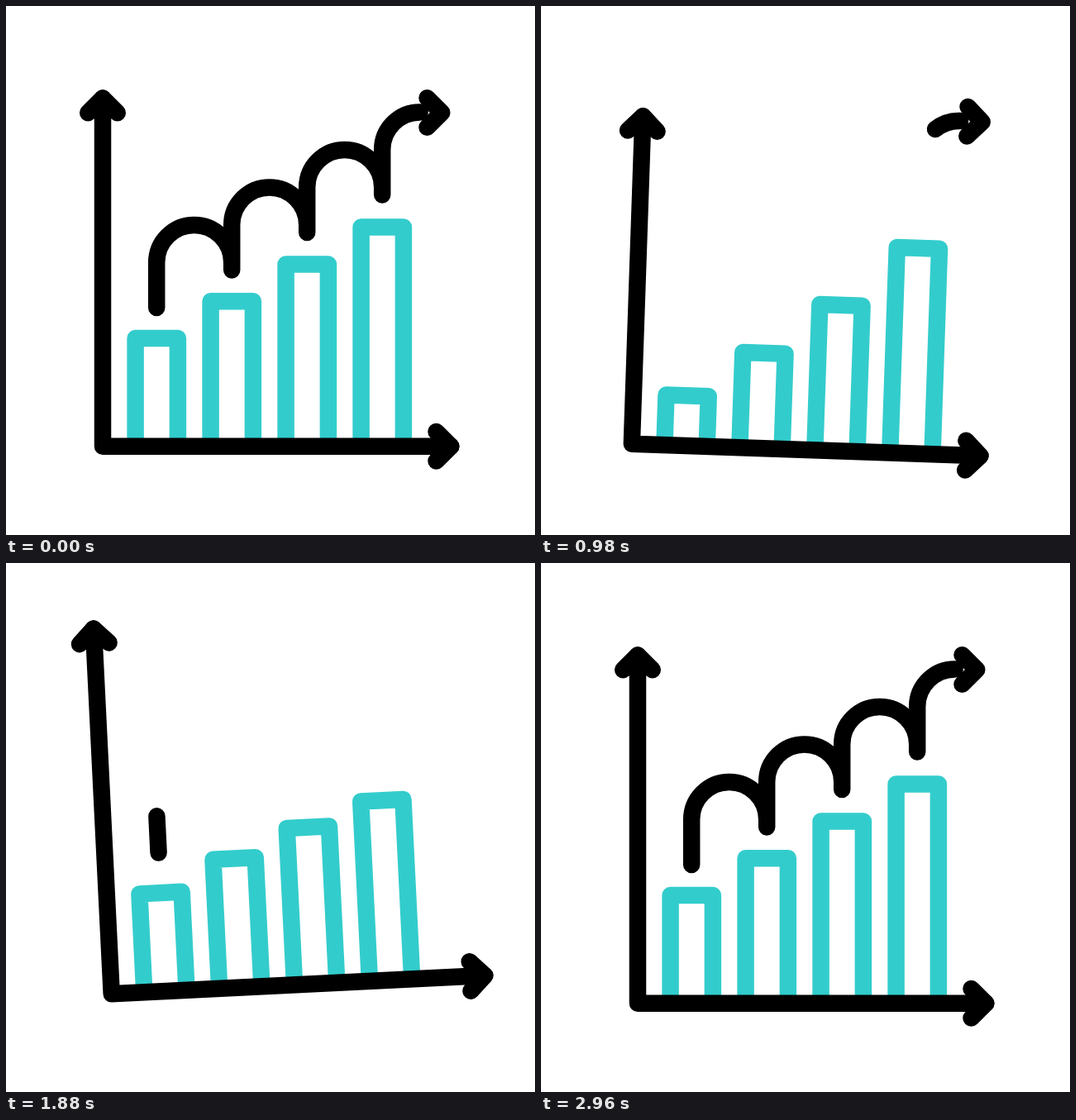
Animation of 640x640 px, one loop 3.6 s. Source, as an HTML page with a canvas:

```html
<!DOCTYPE html>
<html lang="en">
<head>
<meta charset="utf-8">
<title>Growth chart</title>
<style>
  html, body { margin: 0; width: 100%; height: 100%; overflow: hidden; background: #fff; }
  canvas { display: block; }
</style>
</head>
<body>
<canvas id="stage" width="640" height="640"></canvas>
<script>
const g = document.getElementById('stage').getContext('2d');
const LOOP = 3600, BLACK = '#000', TEAL = '#33cccc';
const ORIGIN = { x: 117, y: 532.7 }, AXIS = 421.3;
const R = 45.5, RISE = 54.5, DROP = 9;
const CURVE = 3 * (RISE + Math.PI * R + DROP) + RISE + Math.PI * R / 2;

// Ease along cubic-bezier(a, 0, b, 1)
const bezier = (a, b) => x => {
  let lo = 0, hi = 1, s = 0.5;
  for (let i = 0; i < 20; i++) {
    const u = 1 - s;
    if (3 * u * u * s * a + 3 * u * s * s * b + s * s * s < x) lo = s; else hi = s;
    s = (lo + hi) / 2;
  }
  return s * s * (3 - 2 * s);
};
const soft = p => p * p * (3 - 2 * p);
const snap = bezier(0.15, 0.15);
const glide = bezier(0.33, 0.2);

// Value at time t through [time, value] keys
function track(t, ease, keys) {
  if (t <= keys[0][0]) return keys[0][1];
  for (let i = 1; i < keys.length; i++) {
    const [t0, v0] = keys[i - 1], [t1, v1] = keys[i];
    if (t < t1) return v0 + (v1 - v0) * ease((t - t0) / (t1 - t0));
  }
  return keys[keys.length - 1][1];
}

function line(color, points) {
  g.strokeStyle = color;
  g.beginPath();
  points.forEach(([x, y]) => g.lineTo(x, y));
  g.stroke();
}

function head(x, y, angle) {
  g.save();
  g.translate(x, y);
  g.rotate(angle);
  line(BLACK, [[-17.8, -17.8], [0, 0], [-17.8, 17.8]]);
  g.restore();
}

function bars(t) {
  g.lineCap = 'butt';
  for (let i = 0; i < 4; i++) {
    const grow = track(t - 120 * i, snap, [[200, 0], [475, 18.5], [1310, -79], [2410, 0]]);
    const x = 156.6 + 91 * i, top = 402 - 44.8 * i - grow;
    line(TEAL, [[x, ORIGIN.y], [x, top], [x + 51.3, top], [x + 51.3, ORIGIN.y]]);
  }
  g.lineCap = 'round';
}

function axes(t) {
  const stretch = (low, high) =>
    AXIS + track(t, glide, [[200, 0], [600, low], [2300, high], [2950, 0]]);
  const top = ORIGIN.y - stretch(-40.5, 23.5), right = ORIGIN.x + stretch(-10, 32.5);
  line(BLACK, [[ORIGIN.x, top], [ORIGIN.x, ORIGIN.y], [right, ORIGIN.y]]);
  head(ORIGIN.x, top, -Math.PI / 2);
  head(right, ORIGIN.y, 0);
}

function curve(t) {
  const drawing = t >= 1500;
  const from = drawing ? 0 : CURVE * track(t, glide, [[200, 0], [1260, 1]]);
  const to = drawing ? CURVE * track(t, glide, [[1760, 0], [2760, 1]]) : CURVE;
  if (to - from > 0.001) {
    g.setLineDash([to - from, 2 * CURVE]);
    g.lineDashOffset = -from;
    g.strokeStyle = BLACK;
    g.beginPath();
    g.moveTo(182.2, 365);
    for (let i = 0; i < 4; i++) {
      const x = 182.2 + 2 * R * i, y = 365 - R * i - RISE;
      g.lineTo(x, y);
      g.arc(x + R, y, R, Math.PI, i < 3 ? 2 * Math.PI : 1.5 * Math.PI);
      if (i < 3) g.lineTo(x + 2 * R, y + DROP);
    }
    g.stroke();
    g.setLineDash([]);
  }
  if (t < 1260 || t >= 2700) head(527.3, 129, 0);
}

function draw(now) {
  const t = now % LOOP;
  const tilt = track(t, soft, [[200, 0], [740, 2.9], [1680, -2.85], [1820, -2.85], [2860, 0]]);
  const lift = track(t, soft, [[200, 0], [820, 8.2], [1560, -25.2], [2820, 0]]);
  g.fillStyle = '#fff';
  g.fillRect(0, 0, 640, 640);
  g.save();
  g.lineWidth = 20.5;
  g.lineJoin = 'round';
  g.translate(320, 320 + lift);
  g.rotate(tilt * Math.PI / 180);
  g.translate(-320, -320);
  bars(t);
  axes(t);
  curve(t);
  g.restore();
}

const start = performance.now();
function tick() {
  draw(performance.now() - start);
  requestAnimationFrame(tick);
}
tick();
</script>
</body>
</html>
```
